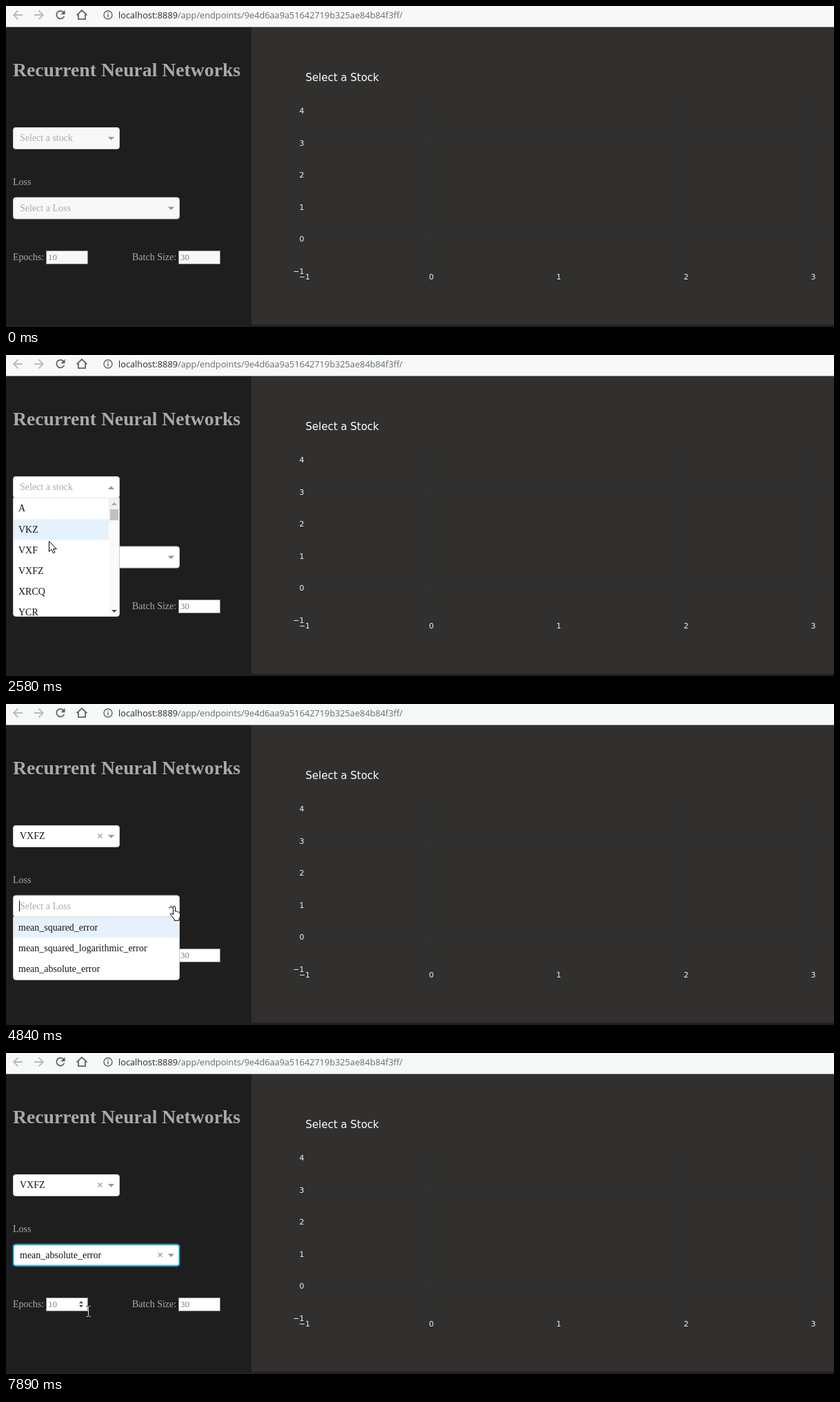
Write an HTML page that moves like this. It is 1201x466 px and loops after 8 s.

```html
<!DOCTYPE html>
<html lang="en">
<head>
<meta charset="utf-8">
<title>Recurrent Neural Networks</title>
<style>
html, body { margin: 0; width: 100%; height: 100%; overflow: hidden; background: #31302f; }
svg { display: block; width: 100vw; height: 100vh; font: 14px "Liberation Serif", serif; fill: #a9a9a9; }
text { white-space: pre; }
.bar { fill: none; stroke: #5f6368; stroke-width: 1.8; }
.plot { font: 11px "DejaVu Sans", sans-serif; fill: #f2f5fa; }
.grid { stroke: #283442; fill: none; }
.box { fill: var(--paper); stroke: #ccc; }
.input { fill: var(--paper); stroke: #858585; }
.small { font-size: 13px; fill: #808080; }
.focus { fill: none; stroke: #0099e6; }
.glow { fill: none; stroke: #0088cc; stroke-width: 4; opacity: .28; }
.hint { fill: #aaa; }
.item { fill: #151515; }
.mark { fill: #e5f2fe; }
.caret { stroke: #000; }
.clear { stroke: #999; stroke-width: 1.1; }
.pointer { fill: #fff; stroke: #000; stroke-linejoin: round; }
#beam { fill: none; stroke: #fff; mix-blend-mode: difference; }
</style>
</head>
<body>
<svg id="stage" viewBox="0 0 1201 466" preserveAspectRatio="none">
  <rect width="1201" height="466" fill="#31302f"/>
  <rect y="30" width="356" height="436" fill="#1e1e1e"/>
  <rect y="462.5" width="1201" height="4" fill="#251e21"/>

  <rect width="1201" height="30.5" fill="#f7f9f8"/>
  <path class="bar" style="stroke:#b8babb" d="M24 13H11.5M17.5 6.7L11.2 13L17.5 19.3M41 13H53.5M47.5 6.7L53.8 13L47.5 19.3"/>
  <path class="bar" d="M83.6 9.3A5.7 5.7 0 1 0 84.4 14.7"/>
  <path fill="#5f6368" d="M85.6 6V12.2H79.4Z"/>
  <path class="bar" d="M102.5 13.4L110 6.3L117.5 13.4M105 12V19.2H115V12"/>
  <circle class="bar" style="stroke-width:1.4" cx="148" cy="13" r="6"/>
  <path class="bar" style="stroke-width:1.5" d="M148 9.2V10.7M148 12V16.4"/>
  <text x="163" y="17.5" font-family="Open Sans, sans-serif" font-size="12.75" fill="#686c70"><tspan fill="#26292c">localhost:8889</tspan>/app/endpoints/9e4d6aa9a51642719b325ae84b84f3ff/</text>

  <g class="grid">
    <path stroke-width="2" opacity=".75" d="M435 338.5H1201M617 152V386"/>
    <path opacity=".75" d="M435 198.5H1201"/>
    <path opacity=".45" d="M986.5 152V386M1171.5 152V386"/>
  </g>
  <g class="plot" id="plot"><text x="434.5" y="108.5" font-size="15" fill="#fff">Select a Stock</text></g>

  <text x="10" y="102" font-size="27.7" font-weight="bold">Recurrent Neural Networks</text>
  <text x="10" y="259.5">Loss</text>
  <text x="10" y="369">Epochs:</text>
  <text x="183" y="369">Batch Size:</text>
  <rect class="input" x="58.5" y="355.5" width="60" height="19"/>
  <rect class="input" x="250.5" y="355.5" width="60" height="19"/>
  <text class="small" x="61" y="368.5">10</text>
  <text class="small" x="253" y="368.5">30</text>
  <path data-on="7890 8000" fill="#505050" d="M106 363.5L109 360L112 363.5ZM106 366L109 369.5L112 366Z"/>

  <g id="lossBox"></g>
  <g id="stockBox"></g>

  <path class="pointer" id="arrow" d="M.5 .5V15.5L4 12.3L6.4 17.6L8.9 16.5L6.6 11.4H11.3Z"/>
  <path class="pointer" id="hand" d="M5 13V2.5Q5 .5 6.5 .5T8 2.5V8Q9.8 7 11 8.6Q12.6 8 13.3 9.7Q15 9.3 15 11.4V15Q15 17 13.5 18.6V21.3H6.5V19L1.4 13Q.4 11.5 1.5 10.9Q3 10.3 5 13Z"/>
  <path id="beam" d="M-3 -7.5H-1L0 -6.5L1 -7.5H3M0 -6.5V6.5M-3 7.5H-1L0 6.5L1 7.5H3"/>
</svg>
<script>
const LOOP = 8000, ROW = 30.3;
const $ = id => document.getElementById(id);

// Axis labels
let ticks = '';
for (let n = -1; n <= 4; n++) {
  const s = n < 0 ? '\u22121' : n;
  ticks += `<text x="432.5" y="${342.3 - 46.6 * n}" text-anchor="end">${s}</text>`;
  if (n < 4) ticks += `<text x="${n < 0 ? 433 : 617 + 184.7 * n}" y="397" text-anchor="middle">${s}</text>`;
}
$('plot').innerHTML += ticks;

// A dropdown: opens at `open`, an item is picked at `pick`, focus ends at `blur`
function dropdown({id, y, w, h, hint, value, items, hover, open, pick, blur, caret, extra = ''}) {
  const right = 10 + w, ax = right - 12.5, cy = y + 15.5, top = y + 31.5;
  const frame = `x="10.5" y="${y + .5}" width="${w - 1}" height="31" rx="3.5"`;
  const down = `M${ax - 4.7} ${cy - 1.5}h9.4l-4.7 4.7Z`;
  const up = `M${ax - 4.7} ${cy + 3.5}h9.4l-4.7 -4.7Z`;
  const cross = `M${ax - 19} ${cy - 3}l6 6m0 -6l-6 6`;
  const rows = items.map((s, i) => `<text class="item" x="18" y="${top + 19.9 + i * 30.2}">${s}</text>`).join('');
  $(id).innerHTML = `
    <rect class="box" ${frame}/>
    <g data-on="${pick} ${blur}"><rect class="glow" ${frame}/><rect class="focus" ${frame}/></g>
    <text class="hint" data-on="0 ${pick}" x="20" y="${y + 20}">${hint}</text>
    <g data-on="${pick} ${LOOP}">
      <text class="item" x="20" y="${y + 20}">${value}</text><path class="clear" d="${cross}"/>
    </g>
    <path data-on="0 ${open} ${pick} ${LOOP}" fill="#999" d="${down}"/>
    <path data-on="${hover} ${open}" fill="#555" d="${down}"/>
    <g data-on="${open} ${pick}">
      <path class="box" d="M10.5 ${top}H${right - .5}v${h - 4}q0 4 -4 4H14.5q-4 0 -4 -4Z"/>
      <path stroke="#e6e6e6" d="M11 ${top}H${right - 1}"/>
      <rect class="mark" id="${id}Mark" x="11" width="${extra ? 138 : w - 2}" height="${ROW - .3}"/>
      <clipPath id="${id}Clip"><rect x="11" y="${top}" width="${w - 2}" height="${h - .5}"/></clipPath>
      <g clip-path="url(#${id}Clip)">${rows}</g>
      <path fill="#999" d="${up}"/>${extra}
    </g>
    <path class="caret" data-on="${caret}" d="M19.5 ${y + 8}v15.5"/>`;
}

dropdown({
  id: 'lossBox', y: 277.5, w: 242, h: 91.5, hint: 'Select a Loss', value: 'mean_absolute_error',
  items: ['mean_squared_error', 'mean_squared_logarithmic_error', 'mean_absolute_error'],
  hover: 4290, open: 4840, pick: 7190, blur: LOOP, caret: '4840 5520 5930 6320 6880 7190'
});
dropdown({
  id: 'stockBox', y: 176, w: 155, h: 172, hint: 'Select a stock', value: 'VXFZ',
  items: ['A', 'VKZ', 'VXF', 'VXFZ', 'XRCQ', 'YCR'],
  hover: 1440, open: 1850, pick: 3580, blur: 4840, caret: '1850 2270 2840 3580',
  extra: `<path fill="#fafafa" d="M149 240H164V378H149Z"/><path fill="#f1f1f1" d="M149 208H164V240H149Z"/>
    <path fill="#c1c1c1" d="M151 224H163V240H151Z"/><path fill="#a3a3a3" d="M153 218l4 -4l4 4Z"/>
    <path fill="#505050" d="M153 370h8l-4 4Z"/>`
});

const stockRows = [[0, 0], [2420, 1], [2720, 2], [2840, 3]];
const lossRows = [[0, 0], [5520, 1], [5930, 2]];

// Pointer: time, shape, x, y
const moves = [
  [0, ''], [900, 'arrow', 424, 414], [1060, 'arrow', 292, 254], [1200, 'arrow', 193, 204],
  [1320, 'arrow', 168, 195], [1440, 'hand', 159, 189.5], [2150, 'arrow', 149, 203],
  [2270, 'arrow', 121, 217], [2420, 'arrow', 87, 242], [2580, 'arrow', 62, 270],
  [2720, 'arrow', 56, 292], [2840, 'arrow', 49, 311], [3430, 'arrow', 50, 318],
  [3850, 'arrow', 125, 312], [3980, 'arrow', 200, 306], [4130, 'arrow', 212, 299],
  [4290, 'hand', 237.5, 293], [5390, 'arrow', 212, 318], [5520, 'arrow', 173, 345],
  [5660, 'arrow', 152, 356], [5780, 'arrow', 138, 363], [5930, 'arrow', 134, 376],
  [6080, 'arrow', 134, 379], [6200, 'beam', 136, 384.5], [7190, 'arrow', 136, 385],
  [7340, 'arrow', 133, 382], [7470, 'arrow', 130, 379], [7620, 'arrow', 125, 377],
  [7740, 'arrow', 120, 376], [7890, 'beam', 119.5, 375]
];

const last = (list, t) => list.filter(k => k[0] <= t).pop();
const timed = [...document.querySelectorAll('[data-on]')].map(el => [el, el.dataset.on.split(' ').map(Number)]);

function draw(t) {
  // An odd count of passed switch times means the part is on
  for (const [el, times] of timed)
    el.style.display = times.filter(x => x <= t).length % 2 ? '' : 'none';
  $('stage').style.setProperty('--paper', t < 1850 ? '#f7f9f8' : '#fff');
  $('stockBoxMark').setAttribute('y', 208 + ROW * last(stockRows, t)[1]);
  $('lossBoxMark').setAttribute('y', 309.5 + ROW * last(lossRows, t)[1]);
  const [, shape, x, y] = last(moves, t);
  for (const id of ['arrow', 'hand', 'beam']) {
    $(id).style.display = id === shape ? '' : 'none';
    if (id === shape) $(id).setAttribute('transform', `translate(${x} ${y})`);
  }
}

const start = performance.now();
function tick() {
  draw((performance.now() - start) % LOOP);
  requestAnimationFrame(tick);
}
tick();
</script>
</body>
</html>
```
